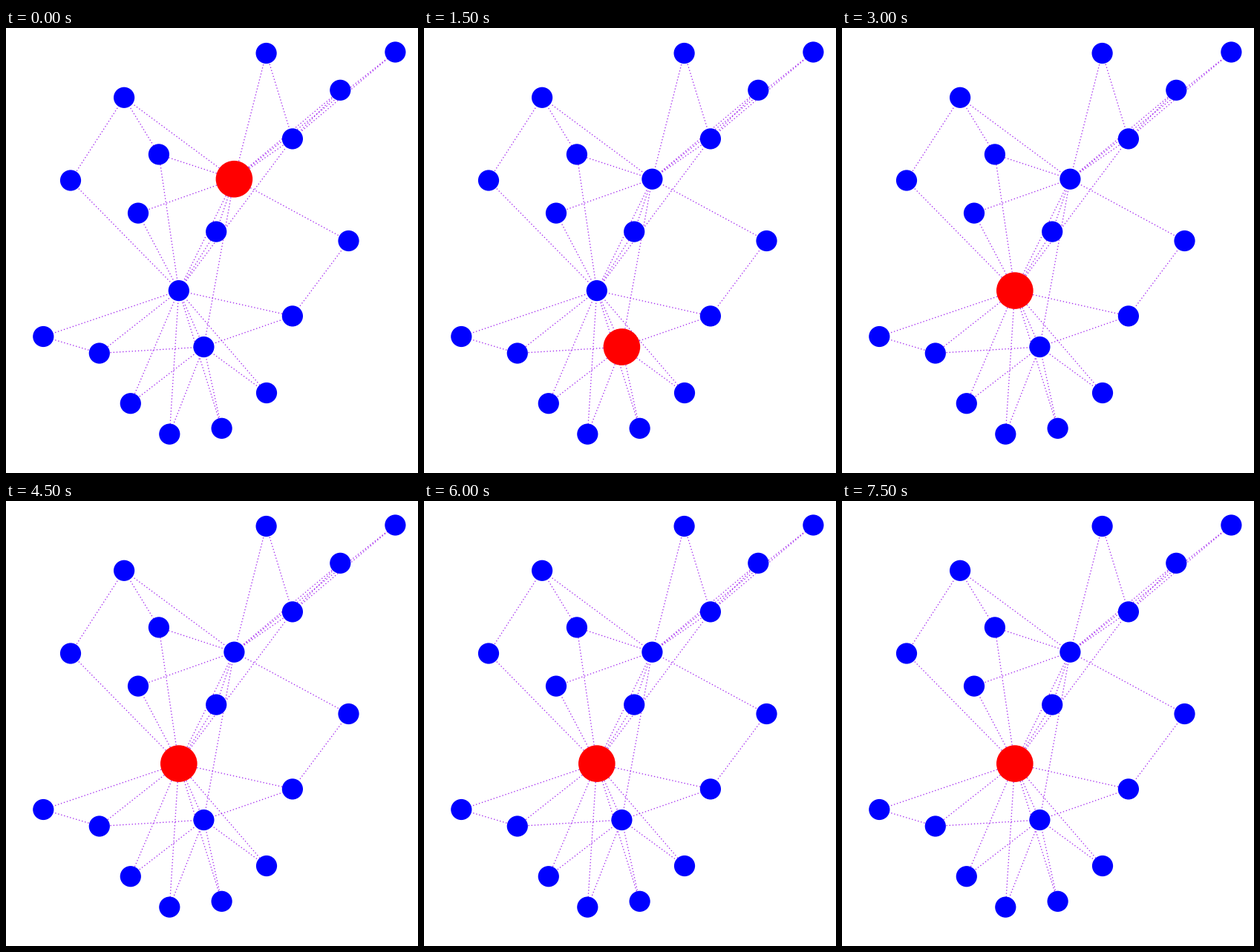
A matplotlib script for the animation above (8 s loop, 555 by 600 pixels).

```python
import matplotlib.pyplot as plt
from matplotlib.animation import FuncAnimation
from matplotlib.collections import LineCollection
from matplotlib.patches import Circle

W, H, DPI = 555, 600, 100
SMALL, LARGE = 14.1, 24.8
STEP_MS = 500

NODES = {
    "A": (350.6, 34), "B": (524.4, 32.5), "C": (450.3, 83.8),
    "D": (385.9, 149.4), "E": (159.1, 93.8), "F": (205.9, 170.4),
    "G": (87, 205.5), "H": (307.4, 203.7), "I": (178, 249.6),
    "J": (283.2, 274.6), "K": (461.5, 287), "L": (232.8, 354.1),
    "M": (385.9, 388.4), "N": (50.3, 416), "O": (125.8, 438.5),
    "P": (266.4, 430), "Q": (167.8, 506.2), "R": (220.3, 547.6),
    "S": (290.6, 539.8), "T": (351, 492),
}

# Each node with the neighbours it links to
LINKS = {
    "H": "ABCDEFIJKLP",
    "L": "DFGIJMNOPQRST",
    "P": "MOQRST",
    "D": "ABC",
    "E": "FG",
    "K": "M",
    "N": "O",
}

# Node visited at each step of the walk
WALK = "HLOPLMLKMLKHLPHL"

fig = plt.figure(figsize=(W / DPI, H / DPI), dpi=DPI, facecolor="white")
ax = fig.add_axes([0, 0, 1, 1])
ax.set_xlim(0, W)
ax.set_ylim(H, 0)
ax.axis("off")

edges = [(NODES[a], NODES[b]) for a, ends in LINKS.items() for b in ends]
ax.add_collection(LineCollection(
    edges, colors="#a020f0", linewidths=1.3 * 72 / DPI,
    linestyles=[(0, (1, 2.2))], zorder=1))

dots = {name: ax.add_patch(Circle(xy, SMALL, lw=0, fc="blue", zorder=2))
        for name, xy in NODES.items()}


def draw(step):
    for name, dot in dots.items():
        active = name == WALK[step]
        dot.set_radius(LARGE if active else SMALL)
        dot.set_facecolor("red" if active else "blue")
        dot.set_zorder(3 if active else 2)
    return list(dots.values())


anim = FuncAnimation(fig, draw, frames=len(WALK), interval=STEP_MS,
                     repeat=True, blit=False)
plt.show()
```
